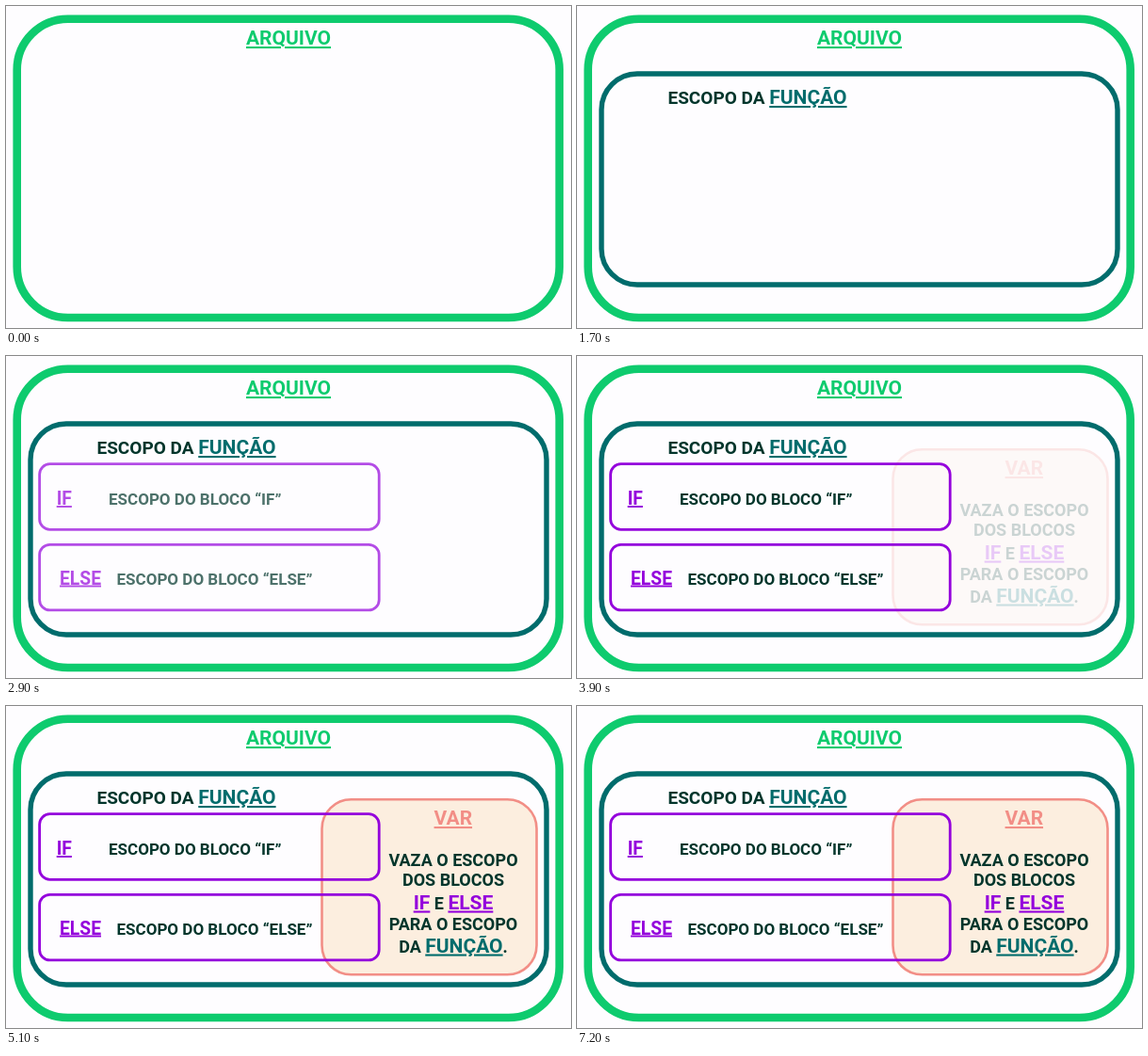
An HTML page for the animation above (7.3 s loop, 600 by 342 pixels).

```html
<!DOCTYPE html>
<html lang="pt">
<head>
<meta charset="utf-8">
<title>Escopo</title>
<style>
  html, body { margin: 0; width: 100%; height: 100%; overflow: hidden; background: #fefdff; }
  svg { display: block; width: 600px; height: 342px; }
  rect { fill: none; }
  text { font: 700 18px Roboto, sans-serif; fill: #00352b; white-space: pre; }
  .mid { text-anchor: middle; }
  .key {
    font-size: 21px;
    text-decoration: underline;
    text-decoration-thickness: 1.6px;
    text-decoration-skip-ink: none;
  }
  .small { font-size: 17px; }
  .label { font-size: 19.3px; }
  .green { fill: #0ecb6e; }
  .teal { fill: #006c6c; }
  .purple { fill: #9400dc; }
  .coral { fill: #f28e86; }

  /* each layer fades in over one second, in ten steps */
  .func { animation: func 7.3s infinite; }
  .blocks { animation: blocks 7.3s infinite; }
  .var { animation: var 7.3s infinite; }
  @keyframes func {
    0% { opacity: 0; }
    9.45% { opacity: 0; animation-timing-function: steps(10, end); }
    23.15%, 100% { opacity: 1; }
  }
  @keyframes blocks {
    0% { opacity: 0; }
    30% { opacity: 0; animation-timing-function: steps(10, end); }
    43.7%, 100% { opacity: 1; }
  }
  @keyframes var {
    0% { opacity: 0; }
    50.55% { opacity: 0; animation-timing-function: steps(10, end); }
    64.25%, 100% { opacity: 1; }
  }
</style>
</head>
<body>
<svg viewBox="0 0 600 342">
  <rect x="11.7" y="13.7" width="576" height="317.3" rx="54" stroke="#0ecb6e" stroke-width="8.6"/>
  <text class="mid key green" x="300" y="41">ARQUIVO</text>

  <g class="func">
    <rect x="26" y="72" width="548" height="224" rx="38" stroke="#006c6c" stroke-width="5.4"/>
    <text x="96.5" y="104" style="font-size:19px">ESCOPO DA <tspan class="key teal">FUNÇÃO</tspan></text>
  </g>

  <g class="var">
    <rect x="335.5" y="99.3" width="228" height="186" rx="31" style="fill:#fceedf" stroke="#f28e86" stroke-width="2.6"/>
    <text class="mid key coral" x="474.8" y="126">VAR</text>
    <text class="mid" x="475" y="169.5">VAZA O ESCOPO</text>
    <text class="mid" x="475" y="190.5">DOS BLOCOS</text>
    <text class="mid" x="475" y="215.5"><tspan class="key purple">IF</tspan> E <tspan class="key purple">ELSE</tspan></text>
    <text class="mid" x="475" y="237.5">PARA O ESCOPO</text>
    <text class="mid" x="475" y="261.5">DA <tspan class="key teal">FUNÇÃO</tspan>.</text>
  </g>

  <g class="blocks">
    <g stroke="#9400dc" stroke-width="2.8">
      <rect x="35.6" y="114.7" width="360.6" height="69.6" rx="11"/>
      <rect x="35.6" y="200.3" width="360.6" height="69.6" rx="11"/>
    </g>
    <text class="key label purple" x="53.7" y="158">IF</text>
    <text class="small" x="109" y="158">ESCOPO DO BLOCO “IF”</text>
    <text class="key label purple" x="57" y="242.5">ELSE</text>
    <text class="small" x="117.5" y="242.5">ESCOPO DO BLOCO “ELSE”</text>
  </g>
</svg>
</body>
</html>
```
